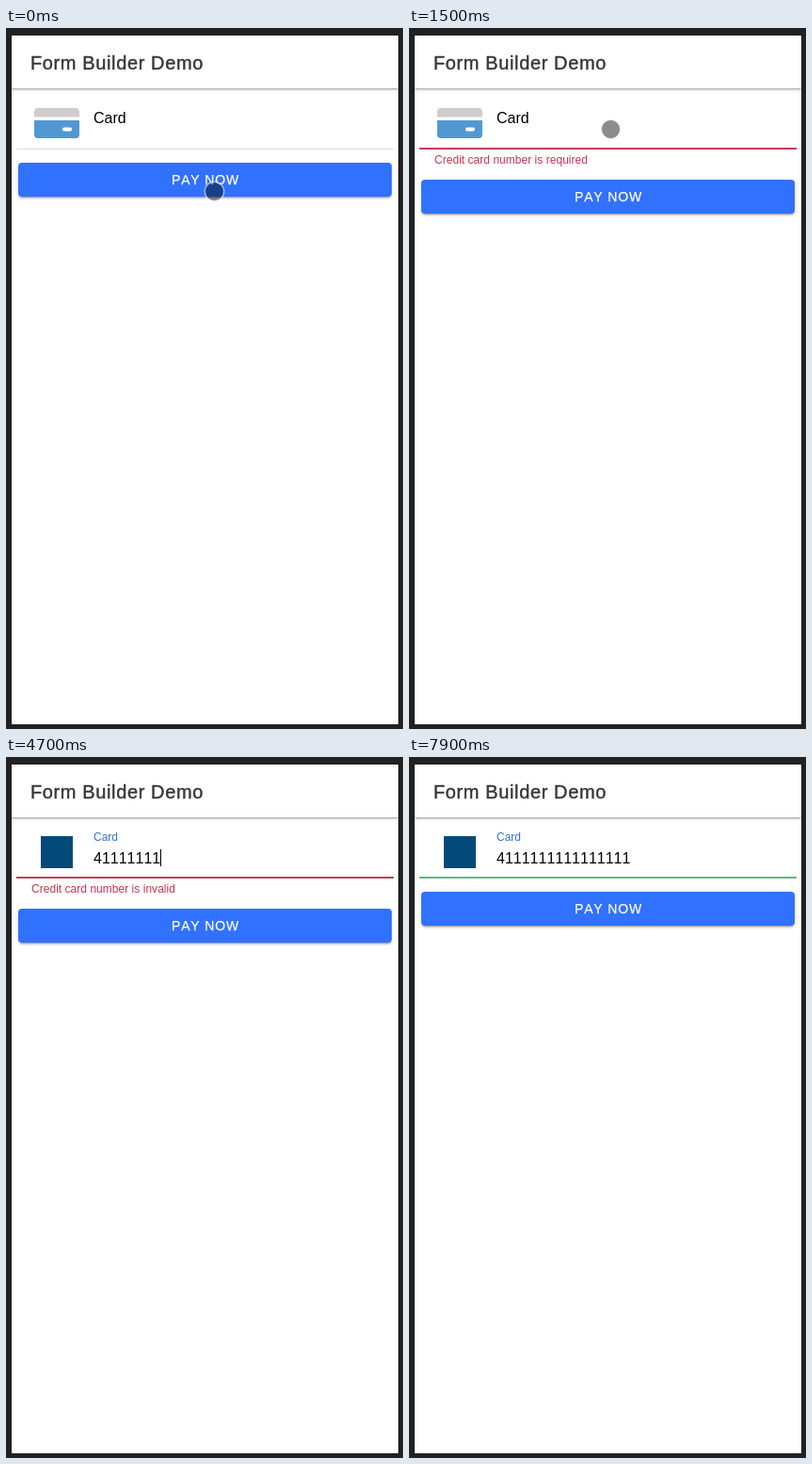
These frames come from a looping animation (422 px wide and 744 px high, 8000 ms). An HTML page:

```html
<!DOCTYPE html>
<html lang="en">
<head>
<meta charset="utf-8">
<title>Form Builder Demo</title>
<style>
  html, body { margin: 0; width: 100%; height: 100%; overflow: hidden; background: #222121; }
  #stage { position: relative; width: 422px; height: 744px; overflow: hidden; background: #222121; }
  #page { position: absolute; left: 6px; top: 8px; width: 411px; height: 731px; overflow: hidden; background: #fff; }
  #head { height: 56px; background: #fff; box-shadow: 0 1px 2px rgba(0,0,0,.36), 0 2px 4px rgba(0,0,0,.1); }
  #btn { position: absolute; left: 13px; width: 397px; height: 36px; border-radius: 4px; background: #3171ff; overflow: hidden; }
  #btn.rest { box-shadow: 0 3px 1px -2px rgba(0,0,0,.2), 0 2px 2px rgba(0,0,0,.14), 0 1px 5px rgba(0,0,0,.12); }
  #btn.active { box-shadow: 0 5px 5px -3px rgba(0,0,0,.2), 0 8px 10px 1px rgba(0,0,0,.14), 0 3px 14px 2px rgba(0,0,0,.12); }
  #ripple { position: absolute; border-radius: 50%; background: #fff; }
  svg { position: absolute; left: 0; top: 0; }
  text { font-family: "Liberation Sans", Arial, Helvetica, sans-serif; font-size: 16px; font-kerning: none; white-space: pre; }
  #title { font-size: 20px; letter-spacing: .62px; fill: #373737; stroke: #373737; stroke-width: .45px; }
  #pay { font-size: 14px; letter-spacing: .84px; fill: #fff; stroke: #fff; stroke-width: .25px; }
  #error { font-size: 12px; letter-spacing: .03px; fill: #cb3350; }
</style>
</head>
<body>
<div id="stage">
  <div id="page"><div id="head"></div></div>
  <div id="btn"><div id="ripple"></div></div>
  <svg width="422" height="744" viewBox="0 0 422 744">
    <text id="title" x="26" y="44">Form Builder Demo</text>
    <g id="blank">
      <path d="M30 94.5V89a4 4 0 0 1 4-4H74a4 4 0 0 1 4 4V94.5Z" fill="#d0cbcc"/>
      <path d="M30 98H78V113a4 4 0 0 1-4 4H34a4 4 0 0 1-4-4Z" fill="#5198d3"/>
      <rect x="60" y="105.5" width="10" height="4" rx="1.8" fill="#fff"/>
    </g>
    <rect id="badge" x="37" y="84" width="34" height="34" fill="#044a78"/>
    <text id="label" x="93">Card</text>
    <text id="digits" x="93" y="113"></text>
    <rect id="caret" y="98" width="1" height="18"/>
    <rect id="line" x="11" width="401"/>
    <text id="error" x="27" y="144"></text>
    <text id="pay" x="176"></text>
    <g id="dot">
      <circle r="10" fill="#000" fill-opacity=".45"/>
      <circle r="10.2" fill="none" stroke="#fff" stroke-opacity=".5" stroke-width="1.6"/>
    </g>
  </svg>
</div>
<script>
const LOOP = 8000, STEP = 100;
const PRESS = 100, CHECK = 200, FOCUS = 1700, VALID = 7000;
const KEYS = [3200, 3500, 3700, 3900, 4100, 4300, 4500, 4700,
              5000, 5300, 5600, 5900, 6200, 6500, 6800, VALID];
const NUMBER = "4" + "1".repeat(15);
const DIGIT_W = 8.9;

const el = id => document.getElementById(id);
const [btn, ripple, blank, badge, label, digits, caret, line, error, pay, dot] =
  ["btn", "ripple", "blank", "badge", "label", "digits", "caret", "line", "error", "pay", "dot"].map(el);

const set = (node, attrs) => {
  for (const k in attrs) node.setAttribute(k, attrs[k]);
};
const show = (node, on) => set(node, { visibility: on ? "visible" : "hidden" });
const span = (t, a, b) => Math.min(1, Math.max(0, (t - a) / (b - a)));
const smooth = p => p * p * (3 - 2 * p);
const mix = (a, b, p) => a + (b - a) * p;

function drawButton(t, invalid) {
  const top = invalid ? 161 : 143;
  btn.style.top = top + "px";
  btn.className = t >= PRESS && t < 900 ? "active" : "rest";

  const r = mix(30, 230, span(t, PRESS, 300));
  const alpha = t < PRESS ? 0 : 0.16 * (1 - span(t, 600, 900));
  Object.assign(ripple.style, {
    left: 208 - r + "px",
    top: 18 - r + "px",
    width: 2 * r + "px",
    height: 2 * r + "px",
    opacity: alpha
  });
  pay.textContent = "PAY NOW";
  set(pay, { y: top + 23 });
}

function drawField(t, invalid) {
  const count = KEYS.filter(k => k <= t).length;
  const typed = count > 0;
  const lift = smooth(span(t, FOCUS, FOCUS + 200));

  show(blank, !typed);
  show(badge, typed);
  set(label, { y: mix(101, 89, lift), fill: t >= FOCUS ? "#3173d8" : "#000" });
  label.style.fontSize = mix(16, 12, lift) + "px";
  digits.textContent = NUMBER.slice(0, count);

  const last = typed ? KEYS[count - 1] : FOCUS;
  show(caret, t >= FOCUS && (t - last) % 1000 < 500);
  set(caret, { x: Math.round(93 + DIGIT_W * count) });

  const plain = t < CHECK;
  set(line, {
    y: plain ? 128 : 127,
    height: plain ? 1 : 2,
    fill: plain ? "#dcdcdc" : invalid ? "#c23c57" : "#55c085"
  });
  error.textContent = invalid ? "Credit card number is " + (typed ? "invalid" : "required") : "";
}

function drawDot(t) {
  const p = smooth(span(t, 900, 1500));
  show(dot, t < KEYS[0]);
  set(dot, { transform: `translate(${mix(221.5, 214.5, p)} ${mix(173.5, 107.5, p)})` });
}

function draw(t) {
  const invalid = t >= CHECK && t < VALID;
  drawButton(t, invalid);
  drawField(t, invalid);
  drawDot(t);
}

const start = performance.now();
function tick() {
  const t = (performance.now() - start) % LOOP;
  draw(Math.floor(t / STEP) * STEP);
  requestAnimationFrame(tick);
}
draw(0);
requestAnimationFrame(tick);
</script>
</body>
</html>
```
